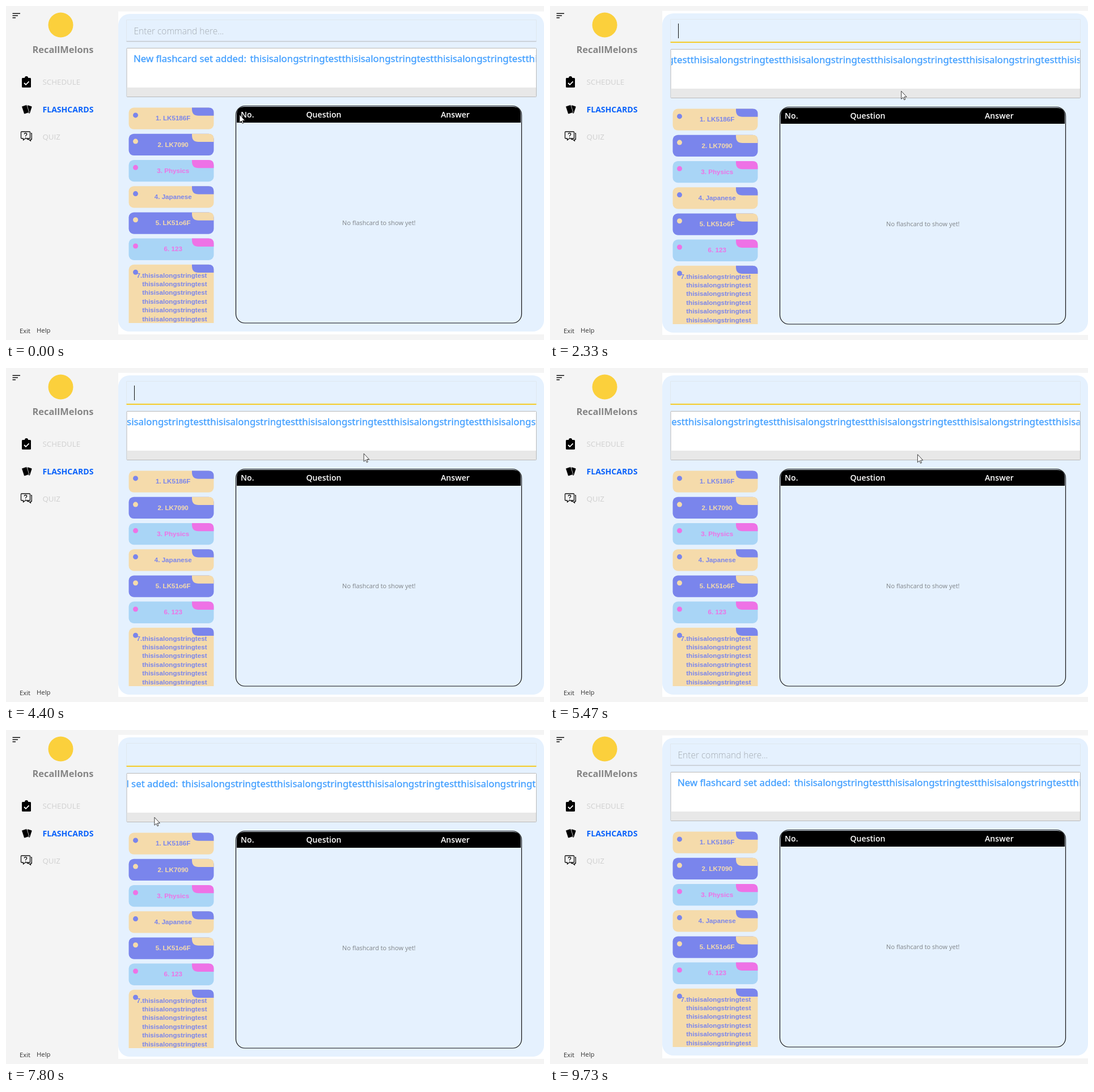
An HTML page for the animation above (9.79 s loop, 949 px wide and 590 px high).

```html
<!DOCTYPE html>
<html lang="en">
<head>
<meta charset="utf-8">
<title>Flashcards</title>
<style>
  html, body { margin: 0; width: 100%; height: 100%; overflow: hidden; background: #f4f4f4; }
  svg { display: block; width: 949px; height: 590px; font-family: "Open Sans", "Noto Sans", sans-serif; }
  .menu { font-size: 13.3px; fill: #d0d0d0; }
  .menu.active { font-size: 14.05px; font-weight: 700; fill: #0a62fb; }
  .small { font-size: 11.3px; fill: #333; }
  .head { font-size: 14.1px; font-weight: 600; fill: #fff; }
  .set { font: 700 11.64px "Liberation Sans", Arial, sans-serif; }
  .message { font: 16.84px "Noto Sans", sans-serif; fill: #409eff; stroke: #409eff; stroke-width: .3; white-space: pre; }
  .focused { display: none; }
  .on .focused { display: inline; }
  .on .idle { display: none; }
  .on #content { transform: translateY(2px); }
</style>
</head>
<body>
<svg id="stage" viewBox="0 0 949 590">
  <defs>
    <clipPath id="listClip"><rect x="210" y="170" width="170" height="390"/></clipPath>
    <clipPath id="outputClip"><rect x="214" y="75" width="720.5" height="69"/></clipPath>
  </defs>

  <!-- Sidebar -->
  <path d="M11.5 13.3H25M11.5 17H21M11.5 20.7H17" stroke="#111" stroke-width="1.6"/>
  <circle cx="96.5" cy="33.5" r="22" fill="#fbd03c"/>
  <text x="100.5" y="83" text-anchor="middle" font-size="16.4" font-weight="700" fill="#858585">RecallMelons</text>
  <path d="M29.5 127H33a3 3 0 0 1 6 0h3.5a1.5 1.5 0 0 1 1.5 1.5v14a1.5 1.5 0 0 1-1.5 1.5h-13a1.5 1.5 0 0 1-1.5-1.5v-14a1.5 1.5 0 0 1 1.5-1.5z"/>
  <path d="M32 136l3 3 5.5-5.7" fill="none" stroke="#fff" stroke-width="1.8"/>
  <rect x="36" y="176" width="8" height="13" rx="1" transform="rotate(18 40 182.5)"/>
  <rect x="29.500" y="175.500" width="9.500" height="14.500" rx="1.200" transform="rotate(-18 34.200 182.700)" stroke="#f4f4f4" stroke-width=".7"/>
  <g fill="none" stroke="#111" stroke-width="1.3" stroke-linejoin="round">
    <path d="M27.5 222h14q1 0 1 1v10q0 1-1 1H34l-3.5 3v-3h-3q-1 0-1-1v-10q0-1 1-1z"/>
    <path d="M44 225h1.3v10.5h-1.8v3l-3.5-3h-3"/>
    <path d="M32.3 226.5q0-2 2.2-2t2.2 2q0 1.2-1.4 2-.8.6-.8 1.5M34.5 231.3v1"/>
  </g>
  <text class="menu" x="64.5" y="139.3">SCHEDULE</text>
  <text class="menu active" x="64.5" y="188">FLASHCARDS</text>
  <text class="menu" x="64.5" y="236.3">QUIZ</text>
  <text class="small" x="24" y="577.5">Exit</text>
  <text class="small" x="54" y="576.5">Help</text>

  <!-- Panel and command field -->
  <g class="idle">
    <rect x="198" y="9.5" width="751" height="570.5" fill="#fff"/>
    <rect x="198" y="14" width="751" height="561" rx="20" fill="#e5f1fe"/>
    <path d="M212.5 62V24.5H935.5V62" fill="none" stroke="#dfe7ee"/>
    <path d="M212.5 62.5H935.5" stroke="#c3c8cd" stroke-width="1.5"/>
    <text x="225.5" y="50" font-size="15.5" font-weight="300" fill="#a4abb2">Enter command here...</text>
  </g>
  <g class="focused">
    <rect x="198" y="8.5" width="751" height="572.5" fill="#fff"/>
    <rect x="198" y="13" width="751" height="564" rx="20" fill="#e5f1fe"/>
    <path d="M212.5 63V23.5H935.5V63" fill="none" stroke="#e0e8ef"/>
    <path d="M212.5 64H935.5" stroke="#f5cb27" stroke-width="2"/>
    <path id="caret" d="M226.5 31V57" stroke="#111"/>
  </g>

  <g id="content">
    <!-- Command output -->
    <rect x="213" y="74.5" width="722.5" height="86" rx="1" fill="#fff" stroke="#b9b9b9"/>
    <rect x="213.5" y="144" width="721.5" height="16" fill="#e8e8e8"/>
    <g clip-path="url(#outputClip)"><g id="message" class="message"></g></g>

    <g id="sets" clip-path="url(#listClip)"></g>

    <!-- Card table -->
    <rect x="405.5" y="176.5" width="504" height="383.5" rx="16" fill="none" stroke="#111" stroke-width="1.2"/>
    <path d="M407 206V192q0-14 14-14H894q14 0 14 14V206z"/>
    <text class="head" x="414" y="197">No.</text>
    <text class="head" x="529.5" y="197">Question</text>
    <text class="head" x="767" y="197">Answer</text>
    <text x="657.8" y="386.5" text-anchor="middle" font-size="11" fill="#7f8488">No flashcard to show yet!</text>
  </g>

  <path id="pointer" d="M0 0V14L3.2 11.1 5.2 15.6 7.1 14.7 5.2 10.3H9.5Z" fill="#fff" stroke="#111" stroke-width=".8"/>
</svg>

<script>
const $ = id => document.getElementById(id);
const LOOP = 9790, STEP = 1000 / 15;
const FOCUS = 960, BLUR = 9720, EXIT = 9130;

const cream = '#f5dbab', violet = '#7a85ec', sky = '#a9d5f6', pink = '#ee72e6';
const themes = [[cream, violet], [violet, cream], [sky, pink]];
const word = 'thisisalongstringtest';
const sets = ['LK5186F', 'LK7090', 'Physics', 'Japanese', 'LK51o6F', '123', word];
const repeat = (n, part) => Array.from({ length: n }, (_, i) => part(i)).join('');

function setCard(name, i) {
  const top = 179.5 + 46.22 * i, [back, front] = themes[i % 3], long = name === word;
  const line = (x, y, anchor, text) =>
    `<text class="set" x="${x}" y="${y}" text-anchor="${anchor}" fill="${front}">${text}</text>`;
  const label = long
    ? repeat(6, n => line(354.5, top + 22.8 + 15.4 * n, 'end', (n ? '' : '7.') + word))
    : line(294.7, top + 22.8, 'middle', `${i + 1}. ${name}`);
  return `<rect x="216.5" y="${top}" width="150" height="${long ? 140 : 38.3}" rx="9" fill="${back}"/>
    <path d="M328 ${top}h29.5q9 0 9 9v5.3h-27q-11.5 0-11.5-11.5z" fill="${front}"/>
    <circle cx="228.5" cy="${top + 13.4}" r="4.5" fill="${front}"/>${label}`;
}
$('sets').innerHTML = sets.map(setCard).join('');
$('message').innerHTML = '<text x="225" y="99">New flashcard set added: </text>' +
  repeat(24, i => `<text x="${430.5 + 162 * i}" y="99">${word}</text>`);

// Turning points of the pointer: time, x, y
const GRAB = 1612, GRIP = 241;
const turns = [
  [70, 412, 192], [FOCUS, 269, 45], [GRAB, GRIP, 152], [2570, 688, 150], [3620, 166, 154], [4850, 834, 150],
  [6545, 217, 159], [7220, 520, 155], [8085, 174, 154], [8600, 236, 153], [EXIT, 79, 590]
];

function pointerAt(t) {
  const n = turns.findIndex(p => p[0] >= t);
  if (n < 1) return turns[n ? turns.length - 1 : 0].slice(1);
  const [t0, x0, y0] = turns[n - 1], [t1, x1, y1] = turns[n];
  const s = (t - t0) / (t1 - t0), ease = s * s * (3 - 2 * s);
  return [x0 + (x1 - x0) * ease, y0 + (y1 - y0) * ease];
}

// The text follows the dragged scrollbar, which is let go for a moment.
const RATIO = 5.218, LAG = 4, LET_GO = 6181, REGRAB = 6440;
function scrollAt(t) {
  if (t < GRAB) return 0;
  const held = t > LET_GO && t < REGRAB ? LET_GO : t - LAG;
  return Math.max(0, RATIO * (pointerAt(held)[0] - GRIP));
}

function draw(now) {
  const t = Math.floor((now % LOOP + 5) / STEP) * STEP;
  $('pointer').setAttribute('transform', `translate(${pointerAt(t)})`);
  $('pointer').style.visibility = t < EXIT ? 'visible' : 'hidden';
  $('message').setAttribute('transform', `translate(${-scrollAt(t)})`);
  $('stage').classList.toggle('on', t >= FOCUS && t < BLUR);
  $('caret').style.visibility = (t - FOCUS) % 1000 < 500 ? 'visible' : 'hidden';
}

const start = performance.now();
function tick() {
  draw(performance.now() - start);
  requestAnimationFrame(tick);
}
tick();
</script>
</body>
</html>
```
